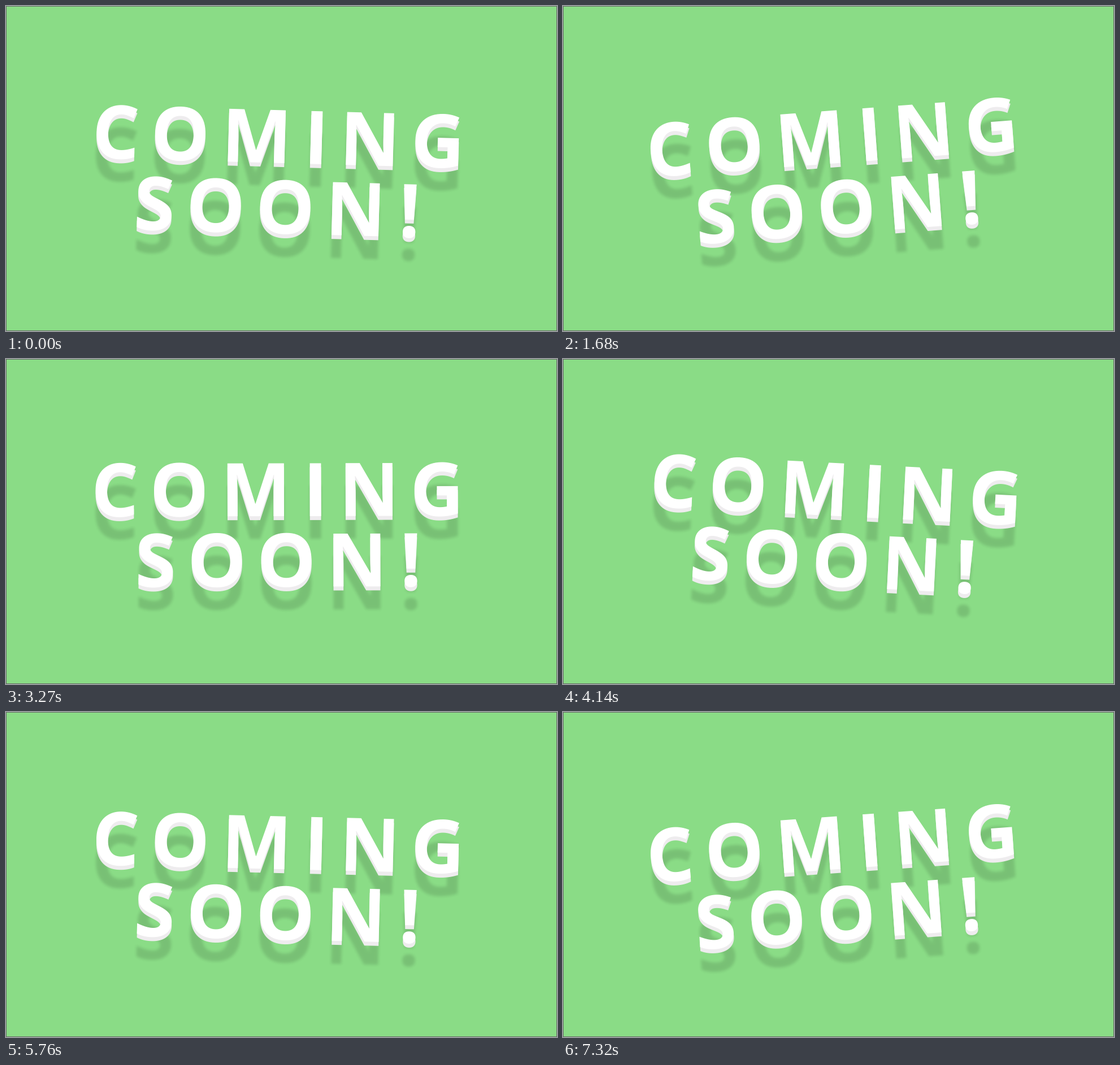
Animation of 975 by 575 pixels, one loop 7420 ms. Source, as an HTML page:

```html
<!DOCTYPE html>
<html lang="en">
<head>
<meta charset="utf-8">
<title>Coming soon</title>
<style>
  html, body { margin: 0; width: 100%; height: 100%; overflow: hidden; background: #8adc86; }
  svg { display: block; width: 975px; height: 575px; }
  text { font: 700 131px "Open Sans", "Noto Sans", sans-serif; text-anchor: middle; }
</style>
</head>
<body>
<svg viewBox="0 0 975 575">
  <defs>
    <filter id="soft" filterUnits="userSpaceOnUse" x="100" y="100" width="775" height="400">
      <feGaussianBlur stdDeviation="2.6"/>
    </filter>
    <g id="words"></g>
  </defs>
  <rect width="975" height="575" fill="#8adc86"/>
  <g id="sign">
    <g filter="url(#soft)" opacity=".12"><use href="#words" y="40" fill="#000"/></g>
    <use href="#words" y="7" fill="#eeecee"/>
    <use href="#words" fill="#fff"/>
  </g>
  <rect x=".5" y=".5" width="974" height="574" fill="none" stroke="#666"/>
</svg>
<script>
const LOOP = 7420;
const STEP = 120;
const LATE = [22, 34, 44, 47];   // steps that arrive 30 ms later
const SWING = 5;                 // degrees to each side
const HALF = 2853;               // ms from one side to the other
const LOWEST = 1880;             // ms at the left-most tilt
const PIVOT = "487.5 289";

// Each letter is centred on its own x.
const rows = [
  { word: "COMING", y: 278, xs: [192.7, 306.7, 442.1, 547.6, 642.6, 762.8] },
  { word: "SOON!", y: 402.6, xs: [264.4, 373, 496, 620.7, 716.2] }
];

const words = document.getElementById("words");
const sign = document.getElementById("sign");

for (const { word, y, xs } of rows) {
  const text = document.createElementNS("http://www.w3.org/2000/svg", "text");
  text.setAttribute("x", xs.join(" "));
  text.setAttribute("y", y);
  text.textContent = word;
  words.append(text);
}

const times = Array.from({ length: 61 }, (_, k) =>
  k * STEP + 30 * LATE.filter(n => k >= n).length);

// Constant-speed swing between -SWING and +SWING.
function angleAt(t) {
  const phase = Math.abs(t - LOWEST) / HALF % 2;
  return SWING * (1 - 2 * Math.abs(1 - phase));
}

function draw() {
  const now = performance.now() % LOOP;
  const held = times.findLast(t => t <= now);
  sign.setAttribute("transform", `rotate(${angleAt(held).toFixed(3)} ${PIVOT})`);
  requestAnimationFrame(draw);
}
draw();
</script>
</body>
</html>
```
